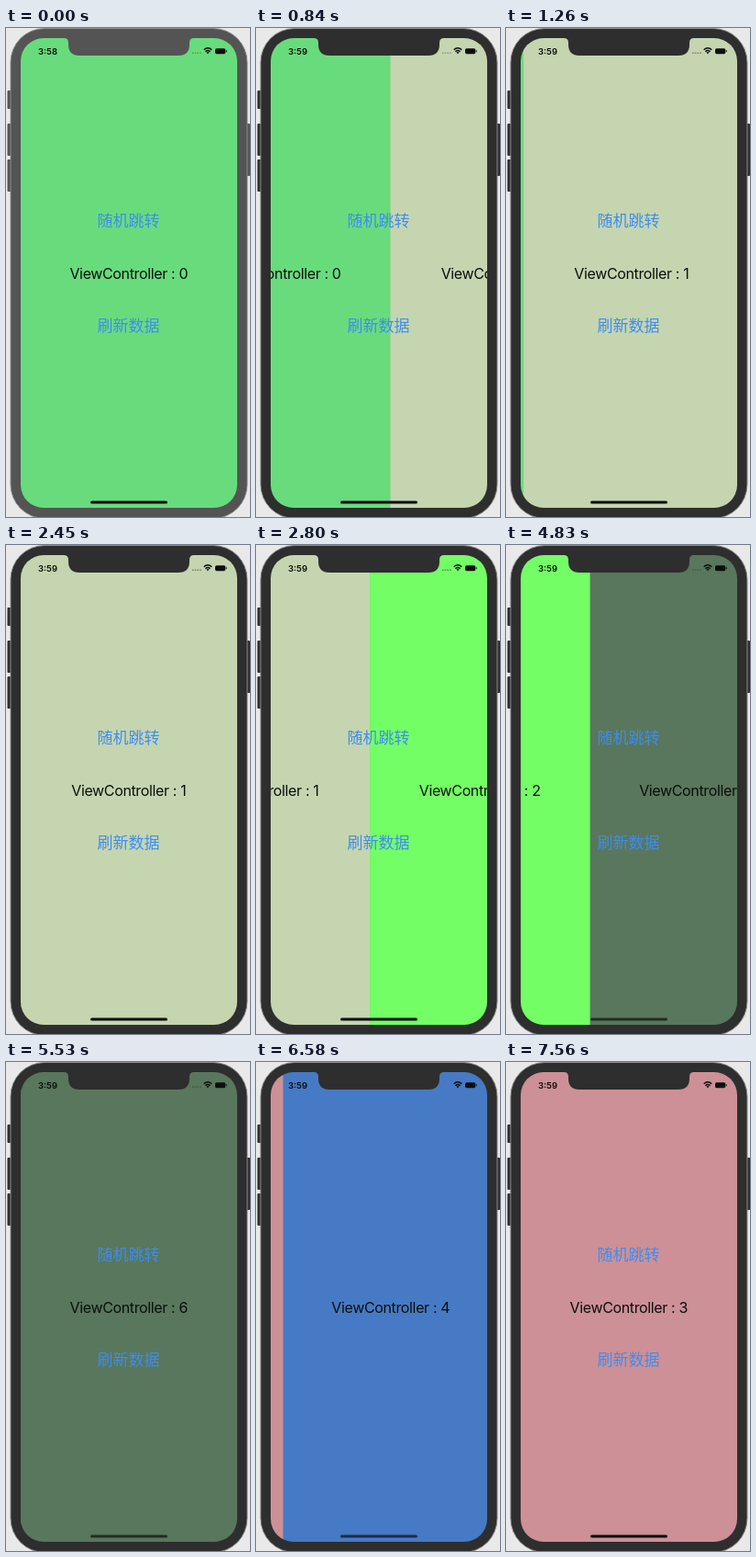
Recreate the animation shown at these times as an HTML page. Size 266 by 532 pixels, loop 7.63 s.

```html
<!DOCTYPE html>
<html lang="zh">
<head>
<meta charset="utf-8">
<title>Paged phone screen</title>
<style>
  html, body { margin: 0; width: 100%; height: 100%; overflow: hidden; background: #e9e9e9; }
  svg { display: block; width: 266px; height: 532px; }
  text { text-anchor: middle; }
  .label { font: 16px Inter, "Liberation Sans", sans-serif; letter-spacing: -.36px; fill: #0c0f0c; }
  .buttons { font: 17px "Noto Sans CJK SC", "Noto Sans CJK", sans-serif; fill: #3f8cee; }
  .clock { font: 600 9.5px Inter, "Liberation Sans", sans-serif; fill: #0c0f0c; }
</style>
</head>
<body>
<svg viewBox="0 0 266 532">
  <defs>
    <clipPath id="screen"><rect x="16" y="11" width="236" height="511" rx="25"/></clipPath>
    <clipPath id="buttonArea"><rect id="buttonRect" y="0" height="532"/></clipPath>
  </defs>

  <rect width="266" height="532" fill="#e9e9e9"/>
  <g class="bezel">
    <rect x="1.5" y="68" width="5" height="20" rx="1"/>
    <rect x="1.5" y="104" width="5" height="35" rx="1"/>
    <rect x="1.5" y="143" width="5" height="35" rx="1"/>
    <rect x="260" y="104" width="6" height="57" rx="1"/>
    <rect x="5" y=".5" width="258" height="533" rx="37" stroke="#8c8c8c"/>
  </g>

  <g clip-path="url(#screen)">
    <g class="page"><rect x="16" y="11" width="236.5" height="511"/><text class="label" x="133.8" y="272.5"></text></g>
    <g class="page"><rect x="16" y="11" width="236.5" height="511"/><text class="label" x="133.8" y="272.5"></text></g>
    <g class="buttons" clip-path="url(#buttonArea)">
      <text x="133.5" y="215.5">随机跳转</text>
      <text x="133.5" y="329.5">刷新数据</text>
    </g>
    <rect id="home" x="92" y="514.5" width="84" height="3" rx="1.5" fill="#0a0a0a"/>
  </g>

  <path class="bezel" d="M63 10H205V11Q200 11 200 16V18Q200 30 188 30H80Q68 30 68 18V16Q68 11 63 11Z"/>
  <text class="clock" id="clock" x="45.5" y="28.5"></text>
  <path id="dots" d="M203 27.3H213" stroke="#222" stroke-width="1.5" stroke-dasharray="1.6 1.1"/>
  <g fill="none" stroke="#0c0f0c" stroke-width="1.5">
    <path d="M215.7 23.8Q220 19.8 224.3 23.8M217.4 25.7Q220 23.4 222.6 25.7"/>
    <path d="M218.4 26.6L220 28.3L221.6 26.6Q220 25.4 218.4 26.6Z" fill="#0c0f0c" stroke="none"/>
  </g>
  <rect x="228" y="22.2" width="11.3" height="6" rx="1.6" fill="#0c0f0c"/>
  <path d="M240.3 24.2V26.2" stroke="#0c0f0c" stroke-width=".9"/>
</svg>

<script>
const LOOP = 7630, STEP = 70, LEFT = 16, WIDTH = 236;
const colors = { 0: "#68dc7d", 1: "#c5d5b0", 2: "#73fe66", 3: "#cd9096", 4: "#467ac5", 6: "#58775c" };
const dotOpacity = { 0: .3, 1: .45, 2: .45, 3: 0, 4: 0, 6: .3 };

// A finger drag that speeds up, then a release that settles exponentially.
const swipe = drag => dt => dt < drag
  ? .542 * (dt / drag) ** 2.4
  : 1 - .458 * Math.exp((drag - dt) / 98);

const glide = dt => {
  const u = Math.min(dt / 450, 1);
  return u * u * (3 - 2 * u);
};

const moves = [
  { start: 0, from: 0, to: 1, ease: swipe(910) },
  { start: 2520, from: 1, to: 2, ease: swipe(280) },
  { start: 4550, from: 2, to: 6, ease: glide },
  { start: 5600, from: 6, to: 4, ease: swipe(280) },
  { start: 6472, from: 4, to: 3, ease: swipe(280) }
];

const byId = id => document.getElementById(id);
const pages = [...document.querySelectorAll(".page")];
const bezels = document.querySelectorAll(".bezel");

function placePage(node, id, x) {
  node.setAttribute("transform", `translate(${x})`);
  node.firstElementChild.setAttribute("fill", colors[id]);
  node.lastElementChild.textContent = `ViewController : ${id}`;
}

function render(time) {
  const { start, from, to, ease } = moves.filter(m => m.start <= time).pop();
  const progress = ease(time - start);
  const direction = Math.sign(to - from);
  const travel = progress > .998 ? WIDTH : progress * WIDTH;
  const fromX = -direction * travel;
  const toX = direction * (WIDTH - travel);
  placePage(pages[0], from, fromX);
  placePage(pages[1], to, toX);

  // The buttons blend into the blue page, so only the other page shows them.
  const buttonX = from === 4 ? toX : to === 4 ? fromX : 0;
  byId("buttonRect").setAttribute("x", LEFT + buttonX);
  byId("buttonRect").setAttribute("width", WIDTH);

  const current = progress < .5 ? from : to;
  byId("home").setAttribute("opacity", current === 4 || current === 6 ? .68 : 1);
  byId("dots").setAttribute("opacity", dotOpacity[current]);

  const active = time >= 70;
  byId("clock").textContent = active ? "3:59" : "3:58";
  bezels.forEach(b => b.setAttribute("fill", active ? "#2e2e2e" : "#545454"));
}

const origin = performance.now();
function tick() {
  const time = (performance.now() - origin) % LOOP;
  render(Math.floor(time / STEP) * STEP);
  requestAnimationFrame(tick);
}
tick();
</script>
</body>
</html>
```
